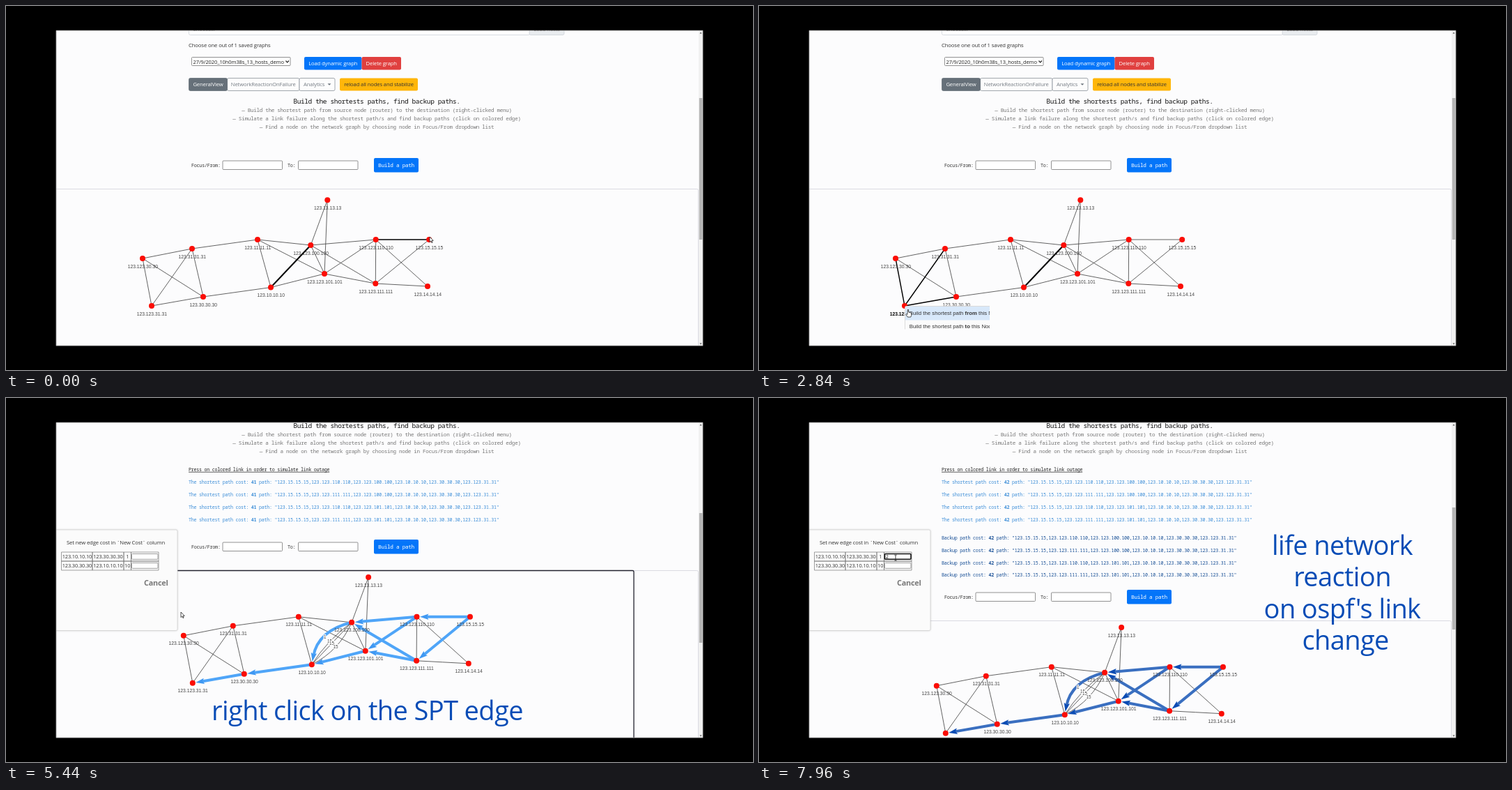
Write an HTML page with a canvas that moves like this. It is 1072 px wide and 522 px high and loops after 8000 ms.

```html
<!DOCTYPE html>
<html lang="en">
<head>
<meta charset="utf-8">
<title>Network graph demo</title>
<style>
html, body { margin: 0; width: 100%; height: 100%; overflow: hidden; background: #000; }
canvas { display: block; width: 1072px; height: 522px; }
</style>
</head>
<body>
<canvas id="stage" width="1072" height="522"></canvas>
<script>
const c = document.getElementById('stage').getContext('2d');
const LOOP = 8000;
const SANS = '"Open Sans", "Noto Sans", sans-serif';
const ARIAL = '"Liberation Sans", Arial, sans-serif';
const MONO = '"Noto Sans Mono", "DejaVu Sans Mono", monospace';

// Moments at which the scene changes, in ms
const T = {
  hoverFirst: 160, menuFirst: 400, pickFirst: 1200, blur: 1760,
  hoverSecond: 1760, menuSecond: 2440, pickSecond: 3920,
  caption: 4520, popup: 5120, focusInput: 6320, typed: 7000,
  reaction: 7600, lastCaption: 7720
};

const NODES = {
  A: [196, 362, '123.123.30.30'], B: [267, 348, '123.31.31.31'],
  C: [209, 430, '123.123.31.31'], D: [283, 417, '123.30.30.30'],
  E: [361, 335, '123.11.11.11'], F: [380, 403.5, '123.10.10.10'],
  G: [437.3, 343, '123.123.100.100'], H: [457, 384, '123.123.101.101'],
  I: [461.3, 278.2, '123.13.13.13'], J: [530.7, 335, '123.123.110.110'],
  K: [530.3, 398, '123.123.111.111'], L: [607.2, 335, '123.15.15.15'],
  M: [605, 402, '123.14.14.14']
};
const EDGES = 'AB AC AD BC BD BE CD DF EF EG EH FG FH GH GI HI GJ HJ GK HK JK JL JM KL KM'.split(' ');
const PATH = 'LJ LK JG JH KG KH HF FD DC'.split(' ');
const onPath = e => PATH.includes(e) || PATH.includes(e[1] + e[0]);

// Pointer: time, x, y, shape
const POINTER = [
  [0, 608, 331, 'arrow'], [400, 611, 336, 'hand'], [800, 611, 336, 'hand'],
  [1050, 640, 345, 'hand'], [1240, 640, 345, 'arrow'], [1740, 209, 431, 'arrow'],
  [2700, 209, 431, 'hand'], [3300, 240, 463, 'hand'], [3960, 240, 463, 'arrow'],
  [4400, 300, 440, 'arrow'], [4900, 396, 389, 'arrow'], [5120, 396, 389, 'arrow'],
  [5400, 251, 307, 'arrow'], [5880, 251, 307, 'arrow'], [6240, 196, 229, 'beam'],
  [LOOP, 196, 229, 'beam']
];

// The interface face is set slightly tight
function text(s, x, y, size, color = '#333', o = {}) {
  c.font = `${o.weight || 400} ${size}px ${o.font || SANS}`;
  c.letterSpacing = (o.spacing ?? (o.font ? 0 : size * -0.016)) + 'px';
  c.textAlign = o.align || 'left';
  c.textBaseline = 'alphabetic';
  c.fillStyle = color;
  c.fillText(s, x, y);
  return c.measureText(s).width;
}

// Narrow monospace: the size follows from the advance
function mono(s, x, y, adv, color, o = {}) {
  const size = adv / 0.56;
  return text(s, x, y, size, color, { ...o, font: MONO, spacing: adv - size * 0.6 });
}

// Draws parts one after another, every second one bold
function runs(parts, x, y, draw) {
  parts.forEach((s, i) => { x += draw(s, x, y, i % 2 ? 700 : 400); });
}

function box(x, y, w, h, fill, stroke, r = 0, lw = 0.8) {
  c.beginPath();
  c.roundRect(x, y, w, h, r);
  if (fill) { c.fillStyle = fill; c.fill(); }
  if (stroke) { c.strokeStyle = stroke; c.lineWidth = lw; c.stroke(); }
}

function line(x1, y1, x2, y2, color, w) {
  c.beginPath();
  c.moveTo(x1, y1);
  c.lineTo(x2, y2);
  c.strokeStyle = color;
  c.lineWidth = w;
  c.stroke();
}

function poly(points, fill, stroke, lw = 0.8) {
  c.beginPath();
  points.forEach(([x, y]) => c.lineTo(x, y));
  c.closePath();
  if (fill) { c.fillStyle = fill; c.fill(); }
  if (stroke) { c.strokeStyle = stroke; c.lineWidth = lw; c.stroke(); }
}

function toolbar() {
  box(262.5, 20, 489, 21.5, '#fff', '#ced4da', 2);
  box(751, 20, 50, 21.5, '#e9ecef', '#ced4da', 2);
  text('Choose...', 268, 36, 7.65, '#555');
  text('Load hosts', 776, 36, 7.65, '#555', { align: 'center' });
  text('Choose one out of 1 saved graphs', 262, 59, 7.7, '#333');
  box(266.5, 73.5, 141.5, 12, '#fff', '#777', 1);
  text('27/9/2020_10h0m38s_13_hosts_demo', 268.5, 82.6, 7.55, '#222');
  c.beginPath();
  c.moveTo(401.5, 78.5); c.lineTo(403.7, 80.8); c.lineTo(405.9, 78.5);
  c.strokeStyle = '#222'; c.lineWidth = 1.2; c.stroke();

  const button = (s, x, y, w, h, fill, color, stroke) => {
    box(x, y, w, h, fill, stroke, 2);
    text(s, x + w / 2, y + h / 2 + 2.8, 7.65, color, { align: 'center' });
  };
  button('Load dynamic graph', 428, 73, 82.5, 18.5, '#0475f9', '#fff');
  button('Delete graph', 510.5, 73, 56.5, 18.5, '#e0403f', '#fff');
  button('NetworkReactionOnFailure', 317.5, 103.5, 103.5, 18, '#fdfdfd', '#757c84', '#8b929a');
  button('GeneralView', 262.5, 103.5, 55, 18, '#667079', '#fff', '#667079');
  box(421, 103.5, 51, 18, '#fdfdfd', '#8b929a', 2);
  text('Analytics', 427, 115.3, 7.65, '#757c84');
  poly([[461.5, 111.2], [466.5, 111.2], [464, 113.8]], '#6c757d');
  button('reload all nodes and stabilize', 479, 103.5, 112, 18, '#ffb60a', '#333');
}

function intro(dy) {
  const mid = { align: 'center' };
  mono('Build the shortests paths, find backup paths.', 532, 139.6 + dy, 5.33, '#111', mid);
  [
    '— Build the shortest path from source node (router) to the destination (right-clicked menu)',
    '— Simulate a link failure along the shortest path/s and find backup paths (click on colored edge)',
    '— Find a node on the network graph by choosing node in Focus/From dropdown list'
  ].forEach((s, i) => mono(s, 532, 152.4 + dy + i * 11.7, 4.265, '#777', mid));
}

function routes(title, y, cost, color) {
  for (let i = 0; i < 4; i++) {
    const exit = i % 2 ? '111.111' : '110.110', relay = i < 2 ? '100.100' : '101.101';
    const parts = [title + ' path cost: ', cost,
      ` path: "123.15.15.15,123.123.${exit},123.123.${relay},123.10.10.10,123.30.30.30,123.123.31.31"`];
    runs(parts, 262, y + i * 17.9, (s, x, py, weight) => mono(s, x, py, 3.75, color, { weight }));
  }
}

function form() {
  mono('Focus/From:', 266, 230.6, 3.8, '#333');
  mono('To:', 404, 230.6, 3.8, '#333');
  box(311, 222, 85.5, 12.5, '#fff', '#777', 1);
  box(419.5, 222, 85.5, 12.5, '#fff', '#777', 1);
  box(528, 218, 64, 20.5, '#0475f9', null, 2);
  mono('Build a path', 560, 231, 4.33, '#fff', { align: 'center' });
}

function edge(a, b, o = {}) {
  const [x1, y1] = NODES[a], [x2, y2] = NODES[b];
  const dx = x2 - x1, dy = y2 - y1, len = Math.hypot(dx, dy), bulge = o.bulge || 0;
  const cx = (x1 + x2) / 2 + dy / len * -bulge, cy = (y1 + y2) / 2 + dx / len * bulge;
  const stop = o.arrow ? 12 : 0, ang = Math.atan2(y2 - cy, x2 - cx);
  const ux = Math.cos(ang), uy = Math.sin(ang);
  c.beginPath();
  c.moveTo(x1, y1);
  c.quadraticCurveTo(cx, cy, x2 - ux * stop, y2 - uy * stop);
  c.strokeStyle = o.color || '#3c3c3c';
  c.lineWidth = o.width || 0.8;
  c.stroke();
  if (o.arrow) {
    const bx = x2 - ux * 17, by = y2 - uy * 17;
    poly([[x2 - ux * 4.5, y2 - uy * 4.5], [bx - uy * 4.2, by + ux * 4.2],
      [bx + ux * 2.5, by + uy * 2.5], [bx + uy * 4.2, by - ux * 4.2]], o.arrow);
  }
  if (o.label) {
    const mx = (x1 + x2) / 4 + cx / 2, my = (y1 + y2) / 4 + cy / 2;
    c.font = '6.3px ' + ARIAL;
    c.textAlign = 'center';
    c.letterSpacing = '0px';
    c.strokeStyle = '#fff';
    c.lineWidth = 2;
    c.strokeText(o.label, mx, my + 2);
    text(o.label, mx, my + 2, 6.3, '#444', { font: ARIAL, align: 'center' });
  }
}

function graph(dx, dy, picked, tint, t) {
  c.save();
  c.translate(dx, dy);
  for (const e of EDGES) {
    if (tint && (e === 'FG' || onPath(e))) continue;
    const strong = picked && e.includes(picked) || (t < T.hoverFirst && e === 'JL');
    edge(e[0], e[1], e === 'FG' ? { width: 2, color: '#000' }
      : strong ? { width: 1.4, color: '#000' } : {});
  }
  if (tint) {
    PATH.forEach(e => edge(e[0], e[1], { width: 4, color: tint[0], arrow: tint[1] }));
    edge('G', 'F', { width: 4, color: tint[0], arrow: tint[1], bulge: 27, label: '1' });
    [8, 0, -15].forEach(bulge => edge('G', 'F', { bulge, label: '15' }));
  }
  for (const k in NODES) {
    const [x, y, name] = NODES[k], own = k === picked;
    c.beginPath();
    c.arc(x, y, 4, 0, 7);
    c.fillStyle = '#fb0d05';
    c.fill();
    text(name, x + 0.3, y + 13.6, 6.75, own ? '#000' : '#444',
      { font: ARIAL, align: 'center', weight: own ? 700 : 400 });
  }
  c.restore();
}

function menu(x, y, w, h, active) {
  c.save();
  c.beginPath();
  c.rect(x - 0.5, y - 0.5, w + 1, h + 1);
  c.clip();
  box(x, y, 144, 39, '#fbfbfb', '#d2d2d2', 2);
  if (active >= 0) box(x + 0.5, y + 0.5 + active * 19, 143, 19.5, '#d8e8fa');
  ['from', 'to'].forEach((word, i) =>
    runs(['Build the shortest path ', word, ' this Node'], x + 6.3, y + 12.4 + i * 19.5,
      (s, px, py, weight) => text(s, px, py, 7.8, '#333', { font: ARIAL, weight })));
  c.restore();
}

function popup(focus, typed) {
  c.save();
  c.shadowColor = 'rgba(0,0,0,.22)';
  c.shadowBlur = 3;
  box(66, 189, 180, 144.5, '#fbfbfb', null, 2);
  c.restore();
  box(66, 189, 180, 144.5, null, '#d2d2d2', 2);
  text('Set new edge cost in `New Cost` column', 87, 209.7, 7.65, '#333');
  const ends = ['123.10.10.10', '123.30.30.30'];
  for (let i = 0; i < 2; i++) {
    const y = 221 + i * 13;
    [[79.5, 44.5], [124, 45], [169, 10.5], [179.5, 39.5]].forEach(([x, w]) => box(x, y, w, 13, null, '#777', 0, 0.7));
    text(ends[i], 80.7, y + 9, 7.4);
    text(ends[1 - i], 125.2, y + 9, 7.4);
    text(i ? '10' : '1', 174.2, y + 9, 7.4, '#333', { align: 'center' });
    const on = focus && !i;
    box(180.5, y + 2.5, 37.5, 7.8, '#fff', on ? '#111' : '#888', 1, on ? 1.6 : 0.8);
  }
  if (typed) text('2', 182, 229.7, 6.8, '#222');
  text('Cancel', 198, 269, 10.8, '#777', { weight: 700 });
}

function pointer(t) {
  const i = POINTER.findIndex(p => p[0] > t), a = POINTER[i - 1], b = POINTER[i];
  const k = (t - a[0]) / (b[0] - a[0]), e = k * k * (3 - 2 * k);
  c.save();
  c.translate(a[1] + (b[1] - a[1]) * e, a[2] + (b[2] - a[2]) * e);
  if (a[3] === 'arrow') {
    poly([[0, 0], [0, 7.6], [1.8, 6], [3, 8.6], [4.1, 8.1], [2.9, 5.6], [5.2, 5.4]], '#fff', '#222');
  } else if (a[3] === 'hand') {
    poly([[0, 0], [1.2, 0], [1.4, 3.6], [5.2, 4.6], [5.4, 8], [4.4, 10.6], [0, 10.6], [-2.6, 6.8], [-1.8, 6], [-0.4, 7]],
      '#fff', '#222');
  } else {
    line(0, -3.5, 0, 4, '#222', 0.9);
    line(-1.7, -3.8, 1.7, -3.8, '#222', 0.8);
    line(-1.7, 4.2, 1.7, 4.2, '#222', 0.8);
  }
  c.restore();
}

function scrollbar(top, bottom) {
  box(994, 35, 6, 452, '#f1f1f1');
  box(994.8, top, 4.6, bottom - top, '#b4b4b4');
  poly([[995.5, 39.5], [998.5, 39.5], [997, 37.5]], '#555');
  poly([[995.5, 483.5], [998.5, 483.5], [997, 485.5]], '#555');
}

function caption(lines, x, y, t) {
  c.globalAlpha = Math.min(1, Math.max(0, t / 160));
  lines.forEach((s, i) => text(s, x, y + i * 45.5, 38, '#084cb6', { align: 'center', weight: 500 }));
  c.globalAlpha = 1;
}

function draw(t) {
  const between = (a, b) => t >= a && t < b;
  const result = t >= T.pickSecond, late = t >= T.reaction;
  const shift = late ? 57 : result ? -15 : 0;
  const focused = between(T.menuFirst, T.blur) || between(T.pickSecond, T.focusInput);
  const picked = between(T.hoverFirst, T.hoverSecond - 160) ? 'L'
    : between(T.hoverSecond, T.pickSecond) ? 'C' : null;

  c.fillStyle = '#000';
  c.fillRect(0, 0, 1072, 522);
  c.save();
  c.beginPath();
  c.rect(72, 35, 928, 452);
  c.clip();
  c.fillStyle = '#fcfcfd';
  c.fillRect(71, 35, 930, 453);

  if (!result) toolbar();
  intro(result ? -97 : 0);
  if (result) {
    const head = 'Press on colored link in order to simulate link outage';
    const w = mono(head, 262, 105, 3.75, '#222');
    line(262, 106.3, 262 + w, 106.3, '#222', 0.7);
    routes('The shortest', 123, late ? '42' : '41', '#3d8ed8');
    if (late) routes('Backup', 202.7, '42', '#174f96');
  }

  c.save();
  c.translate(0, shift);
  form();
  box(60, 262.5, 933.5, 400, null, '#d3d3dc', 2);
  if (focused) box(60, 262.5, 841, 400, null, '#22222e', 2, 1.3);
  c.restore();

  graph(result ? 58.8 : 0, late ? 50.7 : result ? -21.2 : 0, picked,
    late ? ['#3a6fc0', '#0b4cb4'] : result ? ['#4fa5f8', '#3f98f2'] : null, t);

  if (between(T.menuFirst, T.pickFirst)) menu(608.5, 335, 144, 39, t > 920 ? 0 : -1);
  if (between(T.menuSecond, T.pickSecond)) menu(209.5, 430.5, 121, 32.5, t < 2800 ? -1 : t < 3100 ? 0 : 1);
  if (t >= T.popup) popup(t >= T.focusInput, t >= T.typed);

  if (late) scrollbar(157, 332);
  else if (result) scrollbar(165, 351);
  else scrollbar(132, 335);

  if (between(T.caption, T.focusInput)) caption(['right click on the SPT edge'], 518.5, 461.6, t - T.caption);
  if (t >= T.lastCaption) caption(['life network', 'reaction', "on ospf's link", ' change'], 837, 224.9, t - T.lastCaption);
  pointer(t);
  c.restore();
  box(72, 35.2, 928, 452, null, '#a4a4a4', 0, 0.8);
}

function tick() {
  draw(performance.now() % LOOP);
  requestAnimationFrame(tick);
}
tick();
</script>
</body>
</html>
```
